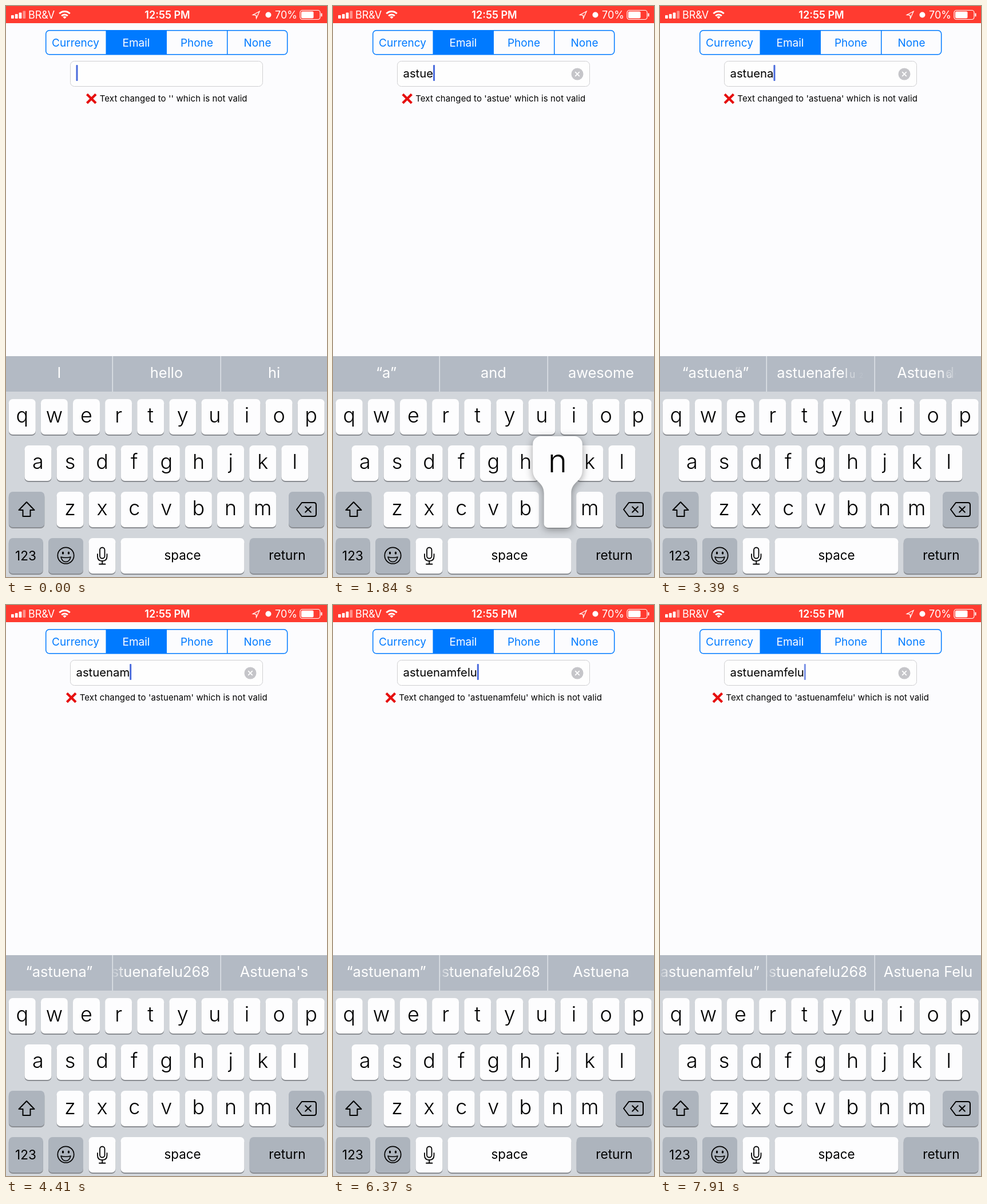
Animation, 561 px wide and 998 px high, one loop 8 s. Source, as an HTML page with a canvas:

```html
<!DOCTYPE html>
<html lang="en">
<head>
<meta charset="utf-8">
<title>Text field validation</title>
<style>
  html, body { margin: 0; width: 100%; height: 100%; overflow: hidden; background: #fcfcfe; }
  canvas { display: block; }
</style>
</head>
<body>
<canvas id="stage" width="561" height="998"></canvas>
<script>
const ctx = document.getElementById('stage').getContext('2d');
const LOOP = 8000;
const BLUE = '#007aff';
const clamp = (v, lo = 0, hi = 1) => Math.min(hi, Math.max(lo, v));
const lerp = (a, b, p) => a + (b - a) * p;

// Each entry: character and the moment it is inserted.
const typed = [['a', 300], ['s', 510], ['t', 720], ['u', 1150], ['e', 1560], ['n', 1900], ['a', 2700],
  ['m', 4000], ['f', 4900], ['e', 5350], ['l', 5750], ['u', 6150]];

const suggestions = [
  { at: -1000, words: ['I', 'hello', 'hi'], inset: 18 },
  { at: 580, words: ['“a”', 'and', 'awesome'], inset: 18 },
  { at: 2350, words: ['“astuen”', 'astuena', 'Astound'], inset: 18 },
  { at: 3255, words: ['“astuena”', 'astuenafelu268', 'Astuena\'s'], inset: 18 },
  { at: 4700, words: ['“astuenam”', 'astuenafelu268', 'Astuena'], inset: 12 },
  { at: 6750, words: ['“astuenamfelu”', 'astuenafelu268', 'Astuena Felu'], inset: 12 },
];
const MORPH = 300;
const slots = [[0, 186], [187, 374], [376, 561]];

const rows = [['qwertyuiop', 4.8, 687], ['asdfghjkl', 32.5, 768], ['zxcvbnm', 88.5, 849]];
const PITCH = 56.1, KEY_W = 47, KEY_H = 62;
const keyAt = {};
for (const [letters, x, y] of rows)
  [...letters].forEach((c, i) => keyAt[c] = { cx: x + i * PITCH + KEY_W / 2, y });

function font(size, weight = 400) {
  ctx.font = `${weight} ${size}px Inter, "Noto Sans", sans-serif`;
}
function text(str, x, y, size, color, align = 'center', weight = 400) {
  font(size, weight);
  ctx.textAlign = align;
  ctx.fillStyle = color;
  ctx.fillText(str, x, y);
}
function rect(x, y, w, h, color) {
  ctx.fillStyle = color;
  ctx.fillRect(x, y, w, h);
}
function round(x, y, w, h, r, fill, stroke, line = 1) {
  ctx.beginPath();
  ctx.roundRect(x, y, w, h, r);
  if (fill) { ctx.fillStyle = fill; ctx.fill(); }
  if (stroke) { ctx.strokeStyle = stroke; ctx.lineWidth = line; ctx.stroke(); }
}
function disc(x, y, r, color) {
  ctx.beginPath();
  ctx.arc(x, y, r, 0, Math.PI * 2);
  ctx.fillStyle = color;
  ctx.fill();
}
function outline(d, color, width, fill) {
  const path = new Path2D(d);
  if (fill) { ctx.fillStyle = fill; ctx.fill(path); }
  ctx.strokeStyle = color;
  ctx.lineWidth = width;
  ctx.stroke(path);
}
function cross(x, y, r, color, width) {
  outline(`M${x - r} ${y - r}L${x + r} ${y + r}M${x + r} ${y - r}L${x - r} ${y + r}`, color, width);
}

function statusBar() {
  rect(0, 0, 561, 30, '#ff3b30');
  [6, 8, 10.5, 13.5].forEach((h, i) =>
    round(9 + i * 6.8, 22 - h, 4.8, h, 1, i < 3 ? '#fff' : '#ff8f88'));
  text('BR&V', 39, 22, 18, '#fff', 'left');
  ctx.strokeStyle = '#fff';
  for (const r of [7.5, 13]) {
    ctx.beginPath();
    ctx.lineWidth = 3;
    ctx.arc(102.5, 22.5, r, -Math.PI * 0.75, -Math.PI * 0.25);
    ctx.stroke();
  }
  outline('M102.5 22L99.8 19.2Q102.5 17.2 105.2 19.2Z', '#fff', 0.8, '#fff');
  text('12:55 PM', 282, 22, 18, '#fff', 'center', 600);
  outline('M431.5 15.5L443 9.5L437.5 21.5L437 16Z', '#fff', 1.3);
  disc(458.5, 15.5, 5, '#fff');
  text('70%', 509, 22, 18, '#fff', 'right');
  round(514, 7.5, 35, 16, 4, null, '#fff', 1.2);
  round(516, 9.5, 21.5, 12, 2, '#fff');
  round(550.5, 12.5, 2, 6, 1, '#fff');
}

function segments() {
  round(69.7, 42.7, 422, 42, 6, '#fcfcfe', BLUE, 1.5);
  rect(174.5, 42.5, 106.5, 42.5, BLUE);
  rect(386, 42.5, 1.5, 42.5, BLUE);
  ['Currency', 'Email', 'Phone', 'None'].forEach((label, i) =>
    text(label, 121.5 + i * 106, 70.6, 19, i === 1 ? '#fff' : BLUE));
}

function caretAlpha(t) {
  const idle = t - 7000;
  if (idle < 0) return 1;
  const phase = idle % 880;
  return phase < 440 ? 1 - clamp(phase / 120) : clamp((phase - 440) / 120);
}

function field(value, t) {
  round(112.5, 96.5, 336, 44, 7, '#fefefe', '#cfcfd2');
  text(value, 122.5, 125, 20.3, '#000', 'left');
  const x = 122.5 + ctx.measureText(value).width;
  ctx.globalAlpha = caretAlpha(t);
  round(x, 103, 3, 28, 1, '#4a6bdc');
  ctx.globalAlpha = 1;
  if (value) {
    disc(427, 119, 10.5, '#c5c5c9');
    cross(427, 119, 3.8, '#fff', 1.8);
  }

  const message = `Text changed to '${value}' which is not valid`;
  font(15);
  ctx.letterSpacing = '0.1px';
  const width = ctx.measureText(message).width;
  const left = 280.7 - (width + 24) / 2;
  text(message, left + 24, 167, 15, '#000', 'left');
  ctx.letterSpacing = '0px';
  cross(left + 9.5, 162, 7.8, '#e60f0f', 4.2);
}

function startOf(word, [left, right], inset) {
  const width = ctx.measureText(word).width;
  return Math.min((left + right) / 2 - width / 2, right - inset - width);
}

// Slides the shared prefix, fades the old tail out and grows the new tail letter by letter.
function morphWord(from, to, slot, insets, p) {
  const [left, right] = slot;
  font(25.4);
  ctx.textAlign = 'center';
  const x = lerp(startOf(from, slot, insets[0]), startOf(to, slot, insets[1]), p);
  let shared = 0;
  while (shared < to.length && from[shared] === to[shared]) shared++;

  ctx.save();
  ctx.beginPath();
  ctx.rect(left, 612, right - left, 62);
  ctx.clip();
  const letter = (word, i, alpha, scale) => {
    if (alpha <= 0) return;
    const end = ctx.measureText(word.slice(0, i + 1)).width;
    const mid = x + end - ctx.measureText(word[i]).width / 2;
    const edge = ctx.createLinearGradient(left, 0, left + 22, 0);
    edge.addColorStop(0, x < left ? 'rgba(255,255,255,.15)' : '#fff');
    edge.addColorStop(1, '#fff');
    ctx.globalAlpha = alpha;
    ctx.fillStyle = edge;
    ctx.save();
    ctx.translate(mid, 650);
    ctx.scale(scale, scale);
    ctx.translate(-mid, -650);
    ctx.fillText(word[i], mid, 650);
    ctx.restore();
  };
  for (let i = shared; i < from.length; i++) letter(from, i, clamp(1 - p * 1.6), 1);
  for (let i = 0; i < to.length; i++) {
    const grown = i < shared ? 1 : clamp((p * 9.5 - (i - shared)) / 2.9);
    const settled = p === 1 ? 1 : grown;
    letter(to, i, settled, lerp(0.4, 1, settled));
  }
  ctx.restore();
}

function suggestionBar(t) {
  rect(0, 612, 561, 62, '#b3bac4');
  rect(185.5, 612, 1.5, 62, '#dfe3e8');
  rect(374.5, 612, 1.5, 62, '#dfe3e8');
  const index = suggestions.findLastIndex(s => s.at <= t);
  const now = suggestions[index], before = suggestions[Math.max(0, index - 1)];
  const p = clamp((t - now.at) / MORPH);
  slots.forEach((slot, i) =>
    morphWord(before.words[i], now.words[i], slot, [before.inset, now.inset], p));
}

function key(x, y, w, color = '#fdfdfe') {
  round(x, y + 2, w, KEY_H, 7, '#898c91');
  round(x, y, w, KEY_H, 7, color);
}

function keyboard() {
  rect(0, 674, 561, 324, '#d2d6db');
  for (const [c, { cx, y }] of Object.entries(keyAt)) {
    key(cx - KEY_W / 2, y, KEY_W);
    text(c, cx, y + 41, 36, '#000', 'center', 300);
  }
  const grey = '#adb4bd';
  key(4.8, 849, 62.5, grey);
  key(494, 849, 62.5, grey);
  key(4.8, 930, 60, grey);
  key(74, 930, 61, grey);
  key(144.5, 930, 47);
  key(200.5, 930, 216);
  key(425.7, 930, 130.8, grey);
  text('123', 34.5, 969, 22.5, '#000');
  text('space', 308.5, 968, 22.4, '#000');
  text('return', 491.5, 968, 22.6, '#000');

  ctx.lineJoin = ctx.lineCap = 'round';
  outline('M36 867L49.5 881H42.5V892H29.5V881H22.5Z', '#000', 2);
  outline('M517 868H538Q542 868 542 872V888Q542 892 538 892H517L508 880Z', '#000', 2);
  cross(528, 880, 4.8, '#000', 2);

  ctx.beginPath();
  ctx.arc(104.5, 960.5, 14.2, 0, Math.PI * 2);
  ctx.lineWidth = 1.7;
  ctx.stroke();
  for (const x of [99.5, 109.5]) {
    ctx.beginPath();
    ctx.ellipse(x, 956, 1.7, 2.6, 0, 0, Math.PI * 2);
    ctx.fillStyle = '#000';
    ctx.fill();
  }
  outline('M96 963Q104.5 965.5 113 963Q111 971.5 104.5 971.5Q98 971.5 96 963Z', '#000', 1.5);

  round(164, 946.5, 8.5, 19, 4.25, null, '#000', 1.8);
  outline('M160 958V962Q160 970 168.2 970Q176.5 970 176.5 962V958M168.2 970V975.5M163 975.5H173.5', '#000', 1.8);
  ctx.lineJoin = 'miter';
  ctx.lineCap = 'butt';
}

function popup(c) {
  const { cx, y } = keyAt[c];
  const top = y - 97, head = 43.3, neck = 23.8, bottom = y + KEY_H + 1;
  const shape = new Path2D();
  shape.moveTo(cx, top);
  shape.arcTo(cx + head, top, cx + head, top + 50, 14);
  shape.lineTo(cx + head, top + 59);
  shape.bezierCurveTo(cx + head, top + 81, cx + neck, top + 78, cx + neck, top + 100);
  shape.arcTo(cx + neck, bottom, cx, bottom, 7);
  shape.arcTo(cx - neck, bottom, cx - neck, top + 100, 7);
  shape.lineTo(cx - neck, top + 100);
  shape.bezierCurveTo(cx - neck, top + 78, cx - head, top + 81, cx - head, top + 59);
  shape.arcTo(cx - head, top, cx, top, 14);
  shape.closePath();
  ctx.save();
  ctx.shadowColor = 'rgba(0,0,0,.38)';
  ctx.shadowBlur = 14;
  ctx.shadowOffsetY = 3;
  ctx.fillStyle = '#fdfdfe';
  ctx.fill(shape);
  ctx.restore();
  text(c, cx, top + 63, 56, '#000', 'center', 300);
}

function withRests(t) {
  const phase = (t - 760) % 840;
  return phase >= 0 && phase < 100 ? t - phase : t;
}

function draw(now) {
  const t = withRests(now % LOOP);
  const value = typed.filter(([, at]) => at <= t).map(([c]) => c).join('');
  rect(0, 0, 561, 998, '#fcfcfe');
  statusBar();
  segments();
  field(value, t);
  suggestionBar(t);
  keyboard();
  for (const [c, at] of typed)
    if (t >= at - 110 && t < at + 60) popup(c);
}

const began = performance.now();
function frame() {
  draw(performance.now() - began);
  requestAnimationFrame(frame);
}
frame();
</script>
</body>
</html>
```
